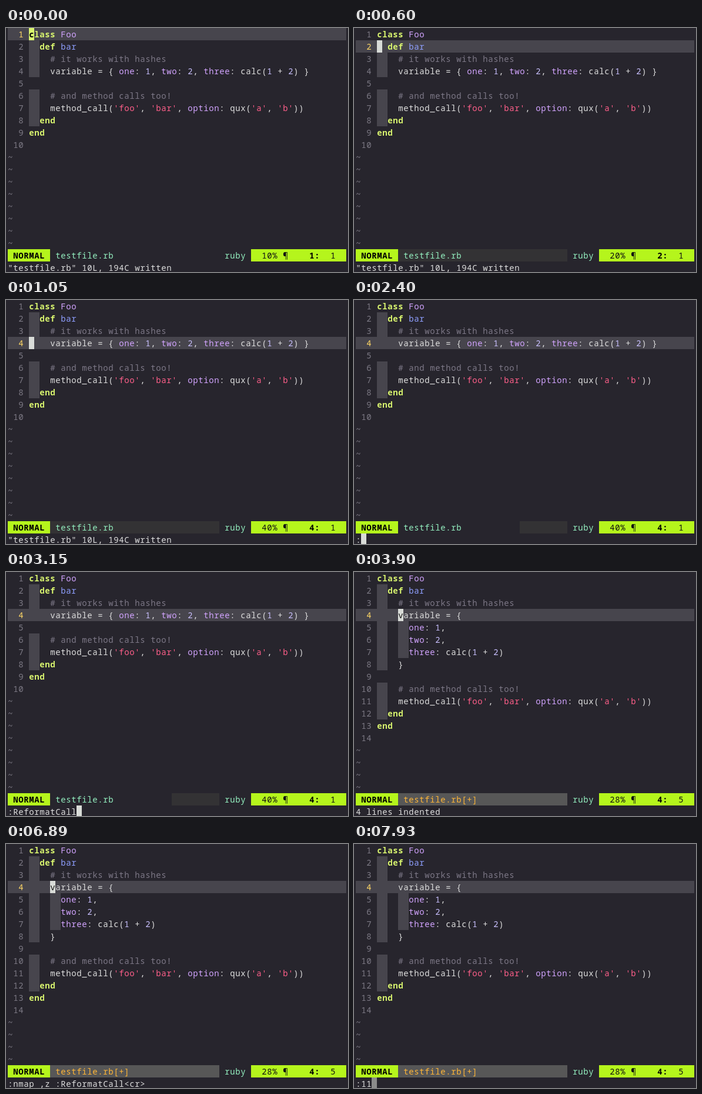
Write an HTML page that moves like this. It is 582 by 417 pixels and loops after 8000 ms.

```html
<!DOCTYPE html>
<html lang="en">
<head>
<meta charset="utf-8">
<title>Editor session</title>
<style>
  html, body { margin: 0; width: 582px; height: 417px; overflow: hidden; background: #27252d; }
  svg { display: block; }
  text {
    font: 500 14px "Noto Sans Mono", "DejaVu Sans Mono", monospace;
    letter-spacing: .6px;
    white-space: pre;
    fill: #dedede;
  }
  .keyword { fill: #d9f56f; font-weight: 700; }
  .constant, .symbol { fill: #d2a4ff; }
  .method { fill: #8f9fff; }
  .number { fill: #c9c0ff; }
  .string { fill: #ff5f8a; }
  .comment { fill: #7d7887; }
  .gutter { fill: #7d7a85; }
  .current { fill: #ffd866; }
  .file { fill: #94f0c0; }
  .modified { fill: #ffb638; }
  .dark { fill: #111; }
  .strong { fill: #000; font-weight: 700; }
</style>
</head>
<body>
<svg id="screen" width="582" height="417" viewBox="0 0 582 417"></svg>
<script>
const LOOP = 8000, CELL = 9, ROW = 21, LEFT = 3, CODE_COL = 4, STATUS = 18, COMMAND = 19;
const LIME = '#b5f51c', RAISED = '#47454d', LIGHT = '#d9dcd8', GRAY = '#8b8b8b';

const head = ['class Foo', '  def bar', '    # it works with hashes'];
const tail = ['', '    # and method calls too!',
  "    method_call('foo', 'bar', option: qux('a', 'b'))", '  end', 'end', ''];
const joined = [...head, '    variable = { one: 1, two: 2, three: calc(1 + 2) }', ...tail];
const split = [...head, '    variable = {', '      one: 1,', '      two: 2,',
  '      three: calc(1 + 2)', '    }', ...tail];

const written = '"testfile.rb" 10L, 194C written';
const call = ':ReformatCall', mapping = `:nmap ,z ${call}<cr>`;

// start time, current line, command row, whether the cursor is in the command row
const steps = [
  [0, 1, written, false],
  [600, 2, written, false],
  [900, 3, written, false],
  [1050, 4, written, false],
  [2400, 4, ':', true],
  [2700, 4, ':R', true],
  [3000, 4, ':Re', true],
  [3150, 4, call, true],
  [3900, 4, '4 lines indented', false],
  [5250, 4, ':', true],
  [5840, 4, call, true],
  [6140, 4, mapping, true],
  [6890, 4, mapping, false],
  [7480, 4, ':', true],
  [7780, 4, ':1', true],
  [7930, 4, ':11', true]
];

const tokens = /(?<comment>#.*)|(?<string>'\w+')|(?<keyword>\b(?:class|def|end)\b)|(?<constant>\b[A-Z]\w*)|(?<method>(?<=def )\w+)|(?<symbol>\w+(?=:))|(?<number>\d+)|(?<plain>[^\s\w#']+|\w+)/g;

const escape = s => s.replace(/&/g, '&amp;').replace(/</g, '&lt;');
const x = col => LEFT + col * CELL;

function text(col, row, str, cls = '') {
  return `<text x="${x(col) + .3}" y="${row * ROW + 16}" class="${cls}">${escape(str)}</text>`;
}

function block(col, row, width, color) {
  return `<rect x="${x(col)}" y="${row * ROW}" width="${width * CELL}" height="${ROW}" fill="${color}"/>`;
}

function codeLine(line, row) {
  let out = '';
  for (const m of line.matchAll(tokens)) {
    const cls = Object.keys(m.groups).find(k => m.groups[k] !== undefined);
    out += text(CODE_COL + m.index, row, m[0], cls);
  }
  return out;
}

function guides(line, row) {
  const indent = line.search(/\S/);
  let out = '';
  for (let col = 0; col < indent; col += 4) out += block(CODE_COL + col, row, 2, RAISED);
  return out;
}

function buffer(lines, current) {
  let out = block(0, current - 1, 64, RAISED);
  for (let row = 0; row < STATUS; row++) {
    if (row >= lines.length) {
      out += text(0, row, '~', 'gutter');
      continue;
    }
    const number = String(row + 1);
    out += guides(lines[row], row)
      + text(3 - number.length, row, number, row + 1 === current ? 'current' : 'gutter')
      + codeLine(lines[row], row);
  }
  return out;
}

function statusFill(time) {
  if (time < 600) return '';
  if (time < 2400) return block(8, STATUS, 32, '#333234');
  if (time < 3900) return block(31, STATUS, 9, '#333234');
  return block(8, STATUS, 32, '#575757');
}

function statusLine(time, line, col, total, modified) {
  const percent = Math.floor(100 * line / total) + '%';
  return statusFill(time)
    + block(0, STATUS, 8, LIME) + text(1, STATUS, 'NORMAL', 'strong')
    + text(9, STATUS, modified ? 'testfile.rb[+]' : 'testfile.rb', modified ? 'modified' : 'file')
    + text(41, STATUS, 'ruby', 'file')
    + block(46, STATUS, 18, LIME)
    + text(48, STATUS, percent, 'dark') + text(52, STATUS, '¶', 'dark')
    + text(57, STATUS, line + ':', 'strong') + text(61, STATUS, String(col), 'dark');
}

function cursor(lines, line, col) {
  const char = lines[line - 1][col - 1];
  const place = CODE_COL + col - 1, row = line - 1;
  return block(place, row, 1, line === 1 ? '#d9f56f' : LIGHT)
    + (char === ' ' ? '' : text(place, row, char, line === 1 ? 'strong' : 'dark'));
}

function draw([time, line, command, typing]) {
  const modified = time >= 3900;
  const lines = modified ? split : joined;
  const col = modified ? 5 : 1;
  return buffer(lines, line)
    + statusLine(time, line, col, lines.length, modified)
    + text(0, COMMAND, command)
    + (typing ? block(command.length, COMMAND, 1, modified ? GRAY : LIGHT) : cursor(lines, line, col));
}

const screen = document.getElementById('screen');
const start = performance.now();
let shown;

function tick() {
  const time = (performance.now() - start) % LOOP;
  const step = steps.findLast(s => s[0] <= time);
  if (step !== shown) {
    shown = step;
    screen.innerHTML = draw(step);
  }
  requestAnimationFrame(tick);
}
tick();
</script>
</body>
</html>
```
